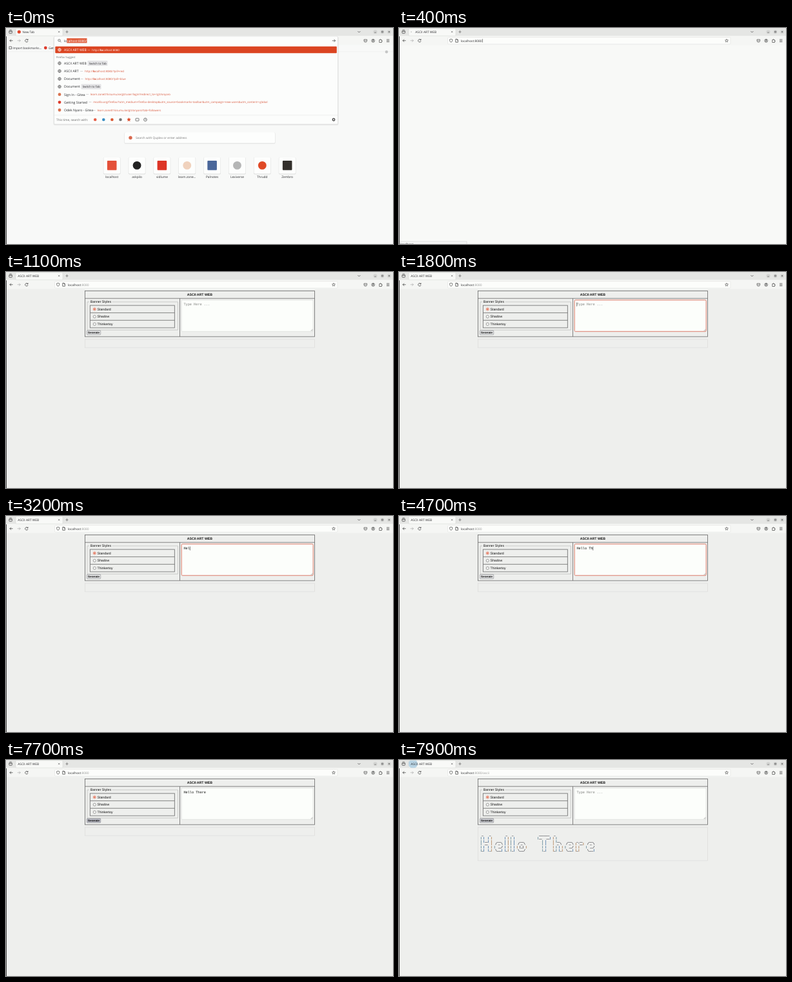
Animation of 600x337 px, one loop 8000 ms. Source, as an HTML page:

```html
<!DOCTYPE html>
<html lang="en">
<head>
<meta charset="utf-8">
<title>ASCII art form</title>
<style>
html, body { margin: 0; width: 100%; height: 100%; overflow: hidden; background: #eeefed; }
svg { display: block; width: 100vw; height: 100vh; }
text { white-space: pre; text-rendering: geometricPrecision; }
.ui { font-family: "Open Sans", "Noto Sans", sans-serif; }
.page { font-family: "Liberation Sans", Arial, sans-serif; }
.mono { font-family: "DejaVu Sans Mono", monospace; }
.art { font-family: "Liberation Mono", monospace; }
</style>
</head>
<body>
<svg id="stage" viewBox="0 0 600 337"></svg>
<script>
const LOOP = 8000;
const RED = '#db4522';
const INK = '#2b2b2e';
const PAGE = '#eeefed';
const BORDER = 'stroke="#666" stroke-width=".8"';

// Markup helpers
const esc = s => s.replace(/&/g, '&amp;').replace(/</g, '&lt;');
const raw = (x, y, size, markup, fill = INK, cls = 'ui', extra = '') =>
  `<text class="${cls}" x="${x}" y="${y}" font-size="${size}" fill="${fill}" ${extra}>${markup}</text>`;
const text = (x, y, size, s, ...rest) => raw(x, y, size, esc(s), ...rest);
const rect = (x, y, w, h, fill, extra = '') =>
  `<rect x="${x}" y="${y}" width="${w}" height="${h}" fill="${fill}" ${extra}/>`;
const dot = (x, y, r, fill, extra = '') => `<circle cx="${x}" cy="${y}" r="${r}" fill="${fill}" ${extra}/>`;
const line = (d, stroke = '#444', width = .7, extra = '') =>
  `<path d="${d}" fill="none" stroke="${stroke}" stroke-width="${width}" ${extra}/>`;
const group = (id, body) => `<g id="${id}">${body}</g>`;
const middle = 'text-anchor="middle"';

const globe = (x, y, c) => dot(x, y, 2.3, 'none', `stroke="${c}" stroke-width=".7"`) +
  line(`M${x - 2.3} ${y}h4.6M${x} ${y - 2.3}q-2.2 2.3 0 4.6q2.2 -2.3 0 -4.6`, c, .5);
const lens = (x, y) => dot(x - .5, y - .5, 1.7, 'none', 'stroke="#444" stroke-width=".7"') +
  line(`M${x + .8} ${y + .8}l1.7 1.7`);
const star = (x, y, r, fill, stroke) => {
  const points = Array.from({ length: 10 }, (_, i) => {
    const a = i * Math.PI / 5 - Math.PI / 2, q = i % 2 ? r * .45 : r;
    return `${(x + q * Math.cos(a)).toFixed(2)},${(y + q * Math.sin(a)).toFixed(2)}`;
  });
  return `<polygon points="${points.join(' ')}" fill="${fill}" stroke="${stroke}" stroke-width=".6"/>`;
};

function chrome() {
  const windowButton = (x, glyph) => dot(x, 6, 3.1, '#d3d4d2') + line(glyph, '#444', .6);
  return rect(0, 0, 600, 12.5, '#e5e6e4') + rect(0, 12.5, 600, 14, '#f5f6f4') +
    rect(4.8, 4.2, 4.6, 4.2, 'none', 'rx=".8" stroke="#444" stroke-width=".7"') + line('M5.5 3h3.2M5 5.7h4.2', '#444', .6) +
    rect(15, .8, 73, 11.4, '#f8f9f7', 'rx="1.3" stroke="#cbccca" stroke-width=".4"') +
    line('M81 4.8l2.4 2.4m0 -2.4l-2.4 2.4M92.3 6h4.4M94.5 3.8v4.4', '#555', .6) +
    line('M545.4 5l2 2l2 -2') +
    windowButton(572.5, 'M571.2 7h2.6') + windowButton(583.5, 'M582.5 5h2v2h-2z') +
    windowButton(594, 'M593 5l2 2m0 -2l-2 2') +
    line('M10.5 19.7h-4.6m2 -2l-2 2l2 2', '#333') + line('M17.7 19.7h4.6m-2 -2l2 2l-2 2', '#aaa') +
    line('M33.6 18.4a2.2 2.2 0 1 0 .4 2M34 17v1.8h-1.8', '#333') +
    line('M555 18h4.6v1.8a2.3 2.3 0 0 1 -4.6 0zM556.2 19.3l1.1 1.1l1.1 -1.1') +
    dot(569.2, 19.8, 2.4, 'none', 'stroke="#444" stroke-width=".7"') + dot(569.2, 19, .9, '#444') + line('M567.7 21.4q1.5 -1.4 3 0') +
    line('M578.8 18.5h1.2v-.8h1v.8h1.4v1.4h.8v1h-.8v1.6h-3.6z') +
    line('M590 18h4.4M590 19.8h4.4M590 21.6h4.4');
}

function addressBar() {
  return rect(75.5, 14.5, 438.5, 10.6, '#fcfdfb', 'rx="1.3" stroke="#dcdddb" stroke-width=".5"') +
    line('M80.7 17.2l2 .6v1.6q0 2 -2 2.9q-2 -.9 -2 -2.9v-1.6z') +
    line('M87.8 17.3h2.3l1.3 1.3v3.6h-3.6zM90 17.3v1.5h1.3', '#333') +
    star(508, 19.8, 2.6, 'none', '#444');
}

function suggestions() {
  const dash = (x, y, url, fill = '#d8553a') => text(x, y, 4.4, '—', fill === '#fff' ? fill : '#888') + raw(x + 7, y, 4.35, url, fill);
  const host = '<tspan font-weight="700">lo</tspan>calhost:8080';
  const rows = [
    [55, 'ASCII ART WEB'],
    [67.2, 'ASCII ART', 115, `http://${host}/?pill=red`],
    [79.3, 'Document', 115.5, `http://${host}/?pill=blue`],
    [91.5, 'Document'],
    [103.7, 'Sign In - Gitea', 124, 'learn.zone01kisumu.ke/git/user/login?redirect_to=/git/onyaro'],
    [115.8, 'Getting Started', 128.3, 'mozilla.org/firefox/?utm_medium=firefox-desktop&amp;utm_source=bookmarks-toolbar&amp;utm_campaign=new-users&amp;utm_content=-global'],
    [128, 'Odek Nyaro - Gitea', 134.5, 'learn.zone01kisumu.ke/git/onyaro?tab=followers'],
  ];
  const list = rows.map(([y, title, x, url], i) => {
    const icon = i < 4 ? globe(83, y, '#555') : dot(83, y, 2.4, i === 5 ? '#dd3b2b' : '#d97350');
    const switchX = i ? 116.5 : 126.5;
    const tail = url ? dash(x, y + 1.6, url)
      : rect(switchX, y - 3.9, 31, 7.8, '#e3e3e5', 'rx="1"') + text(switchX + 2.2, y + 1.6, 4.4, 'Switch to Tab');
    return icon + text(90, y + 1.8, 5.1, title) + tail;
  }).join('');
  const engines = ['#e6604a', '#3b8fc4', '#dc5a35', '#777'].map((c, i) => dot(138.2 + 13.1 * i, 143, 2.3, c)).join('');
  return rect(73.5, 13.5, 442, 138.2, '#000', 'rx="2" opacity=".08"') +
    rect(74.5, 13, 440, 137, '#fcfdfc', 'rx="1.6" stroke="#d4d4d4" stroke-width=".5"') +
    lens(83, 19.8) + text(90, 21.6, 4.9, 'lo') +
    rect(94.3, 16, 31.2, 7.4, '#e0603f') + text(94.3, 21.6, 4.9, 'calhost:8080/', '#fff') +
    line('M505.8 19.8h4.8m-2 -2l2 2l-2 2', '#333') +
    rect(76.3, 28.7, 436.5, 10.6, RED, 'rx="1"') + globe(83, 34, '#fff') +
    text(90, 35.8, 5.1, 'ASCII ART WEB', '#fff') + dash(126.3, 35.6, 'http://' + host, '#fff') +
    text(78, 47.2, 4.2, 'Firefox Suggest', '#666') + list +
    line('M74.5 136h440', '#dedede', .5) + text(78, 144.7, 4.75, 'This time, search with:', '#666') + engines +
    star(190.5, 143, 2.8, RED, RED) + rect(201, 141, 5, 4, 'none', 'rx=".7" stroke="#444" stroke-width=".7"') +
    dot(216, 143, 2.4, 'none', 'stroke="#444" stroke-width=".7"') + line('M216 141.5v1.6h1.2', '#444', .5) +
    dot(508, 143, 1.8, 'none', 'stroke="#444" stroke-width="1.2"') + dot(508, 143, .6, '#444');
}

function newTab() {
  const tiles = [
    ['localhost', 'square', '#e4513a'], ['askpilo', 'round', '#222'], ['vidlume', 'square', '#dd3526'],
    ['learn.zone…', 'round', '#f0d2bd'], ['Palnotes', 'square', '#4a679a'], ['Lexiverse', 'round', '#b5b6b6'],
    ['Thrudd', 'round', '#e04a27'], ['Zembro', 'square', '#33302c'],
  ];
  const shadowed = (x, y, w, h) => rect(x - .6, y, w + 1.2, h + 1.2, '#000', 'rx="2" opacity=".09"') + rect(x, y, w, h, '#fdfefd', 'rx="1.7"');
  const grid = tiles.map(([name, shape, color], i) => {
    const x = 164.2 + 38.85 * i;
    const mark = shape === 'round' ? dot(x, 214.4, 6.4, color) : rect(x - 7.3, 207.1, 14.6, 14.6, color, 'rx="1"');
    return shadowed(x - 12.8, 201.7, 25.6, 25.6) + mark + text(x, 234.4, 4.8, name, INK, 'ui', middle);
  }).join('');
  return rect(0, 26.5, 600, 311, '#f8f9f8') + line('M0 36.8h600', '#e3e4e3', .4) +
    dot(20.3, 6, 2.6, '#e0472c') + text(25.6, 7.7, 4.7, 'New Tab') +
    rect(5, 29, 3.6, 3.8, 'none', 'stroke="#444" stroke-width=".7"') + text(10.2, 32.7, 4.75, 'Import bookmarks…') +
    dot(61.3, 31, 2.4, '#dd3b2b') + text(66, 32.7, 4.75, 'Getting Started') +
    dot(590, 37.2, 2.2, '#c4c5c5') +
    shadowed(184, 163, 233, 16.6) + dot(193, 171.2, 2.7, '#d9694e') +
    text(201, 172.9, 4.7, 'Search with Quplex or enter address', '#777') + grid + suggestions();
}

function formPage() {
  const options = ['Standard', 'Shadow', 'Thinkertoy'].map((name, i) => {
    const y = 58 + 11.65 * i;
    return dot(137.3, y, 2.1, '#fbfcfa', `stroke="${i ? '#777' : '#e06a50'}" stroke-width=".7" id="radio${i}"`) +
      (i ? '' : dot(137.3, y, 1.2, '#e06a50', 'id="radioDot"')) + text(141.5, y + 1.8, 5.2, name, '#111', 'page');
  }).join('');
  return rect(0, 26.5, 600, 311, PAGE) +
    rect(122.5, 29.4, 356, 71.5, 'none', BORDER) +
    line('M122.5 41.2h356M269.5 41.2v59.7', '#666', .8) +
    text(300.4, 37, 5.2, 'ASCII ART WEB', '#111', 'page', middle + ' font-weight="700"') +
    rect(126, 46.8, 140.4, 43.7, 'none', 'stroke="#bdbebc" stroke-width=".7"') +
    rect(129.5, 44, 35, 5.5, PAGE) + text(130.7, 48.4, 5.2, 'Banner Styles', '#111', 'page') +
    rect(130.3, 52.1, 131, 34.9, 'none', BORDER) +
    line('M130.3 63.7h131M130.3 75.3h131', '#666', .8) + options +
    rect(125.3, 91.3, 21.4, 6.5, '#e2e3e4', 'rx=".9" stroke="#85868c" stroke-width=".6" id="button"') +
    text(136, 96.1, 4.3, 'Generate', '#000', 'page', middle + ' stroke="#000" stroke-width=".1"') +
    rect(272.2, 43.8, 204, 49, '#fcfefb', 'rx="1.4" id="area"') +
    line('M472.6 92l2.8 -2.8m-1.2 2.8l1.2 -1.2', '#777', .5) +
    text(275.5, 52.3, 5.2, '', '#111', 'mono', 'id="typed"') +
    rect(0, 47.6, .6, 6, '#222', 'id="caret"') +
    rect(122.5, 105, 356, 13, 'none', 'stroke="#d3d4d2" stroke-width=".5" id="result"') + group('art', banner());
}

// Each glyph: six rows separated by line breaks
const GLYPHS = {
  H: String.raw` _    _  
| |  | | 
| |__| | 
|  __  | 
| |  | | 
|_|  |_| `,
  e: String.raw`       
       
  ___  
 / _ \ 
|  __/ 
 \___| `,
  l: String.raw` _  
| | 
| | 
| | 
| | 
|_| `,
  o: String.raw`        
        
  ___   
 / _ \  
| (_) | 
 \___/  `,
  T: String.raw` _______  
|__   __| 
   | |    
   | |    
   | |    
   |_|    `,
  h: String.raw` _      
| |     
| |__   
|  _ \  
| | | | 
|_| |_| `,
  r: String.raw`       
       
 _ __  
| '__| 
| |    
|_|    `,
};

// Bars take a colour fringe from where they fall within a pixel
function banner() {
  const tints = ['#a8703f', '#2f649c', '#4b7688'];
  const tintAt = column => Math.floor((column * 2.34 + .9) % 1 * tints.length);
  const glyphs = [...MESSAGE].map(c => (GLYPHS[c] || Array(6).fill('      ').join('\n')).split('\n'));
  return Array.from({ length: 6 }, (_, i) => {
    const row = glyphs.map(g => g[i]).join('');
    const layer = (keep, color) => text(125.9, 117.6 + 4.95 * i, 3.9,
      [...row].map((c, column) => keep(c, column) ? c : ' ').join(''),
      color, 'art', `stroke="${color}" stroke-width=".25"`);
    return layer(c => c !== '|', '#4a4b50') +
      tints.map((color, k) => layer((c, column) => c === '|' && tintAt(column) === k, color)).join('');
  }).join('');
}

const MESSAGE = 'Hello There';
const KEY_TIMES = [2700, 3000, 3200, 3400, 3600, 3800, 4400, 4700, 4900, 5400, 5600];
const CHAR_WIDTH = 5.2 * .602;

const stage = document.getElementById('stage');
stage.innerHTML =
  `<defs><clipPath id="tabClip">${rect(15, .8, 73, 11.4, '#000', 'rx="1.3"')}</clipPath></defs>` +
  rect(0, 0, 600, 337, '#f8f9f7') + chrome() +
  group('form', formPage()) +
  group('site', addressBar() +
    `<g clip-path="url(#tabClip)">${dot(21.8, 6, 8, '#a9cbe0', 'id="burst"')}</g>` +
    text(18.3, 7.7, 4.8, 'ASCII ART WEB', INK, 'ui', 'id="tabTitle"') + dot(19, 6, .6, '#777', 'id="throbber"') +
    raw(95.8, 21.5, 4.85, 'localhost<tspan id="port">:8080</tspan><tspan id="path" fill="#999">/ascii</tspan>') +
    rect(129, 17, .5, 5.6, '#222', 'id="urlCaret"')) +
  group('status', rect(0, 333, 105, 5, '#f5f6f5', 'stroke="#c8c8c8" stroke-width=".5"') + text(2, 338.6, 4.8, 'localhost')) +
  group('home', newTab()) +
  rect(0, 13, .9, 324, '#333');

const el = {};
stage.querySelectorAll('[id]').forEach(node => el[node.id] = node);
const show = (node, on) => node.setAttribute('display', on ? 'inline' : 'none');
const set = (node, attrs) => Object.entries(attrs).forEach(([k, v]) => node.setAttribute(k, v));
const within = (t, from, to) => t >= from && t < to;

function update(t) {
  const loading = within(t, 400, 500);
  const answered = t >= 7900;
  show(el.home, t < 400);
  show(el.site, t >= 400);
  show(el.form, t >= 500);
  [el.status, el.throbber, el.urlCaret].forEach(node => show(node, loading));
  set(el.tabTitle, { x: loading ? 25.3 : 18.3 });
  set(el.port, { fill: loading ? INK : '#999' });
  show(el.path, answered);

  // Ring of light that spreads over the tab when a page has loaded
  const age = answered ? t - 7900 : t - 400;
  show(el.burst, answered || within(t, 500, 900));
  set(el.burst, { r: 7 + age * .13, opacity: Math.max(0, .8 - age / 500) });

  const count = answered ? 0 : KEY_TIMES.filter(k => t >= k).length;
  el.typed.textContent = count ? MESSAGE.slice(0, count) : 'Type Here ...';
  set(el.typed, { fill: count ? '#111' : '#858684' });
  show(el.caret, within(t, 1800, 6700) && !within(t, 4200, 4400));
  set(el.caret, { x: 275.5 + count * CHAR_WIDTH });

  const focused = within(t, 1800, 7700);
  set(el.area, { stroke: focused ? '#dc7a68' : '#cfd0ce', 'stroke-width': focused ? 1 : .5 });
  const radioColor = within(t, 6900, 7000) ? '#c24a2e' : '#e06a50';
  set(el.radio0, { stroke: radioColor });
  set(el.radioDot, { fill: radioColor });
  set(el.button, { fill: within(t, 7700, 7900) ? '#b9bac4' : t >= 7200 ? '#cbccd2' : '#e2e3e4' });

  show(el.art, answered);
  set(el.result, { height: answered ? 52 : 13 });
}

const start = performance.now();
function frame() {
  update((performance.now() - start) % LOOP);
  requestAnimationFrame(frame);
}
update(0);
requestAnimationFrame(frame);
</script>
</body>
</html>
```
